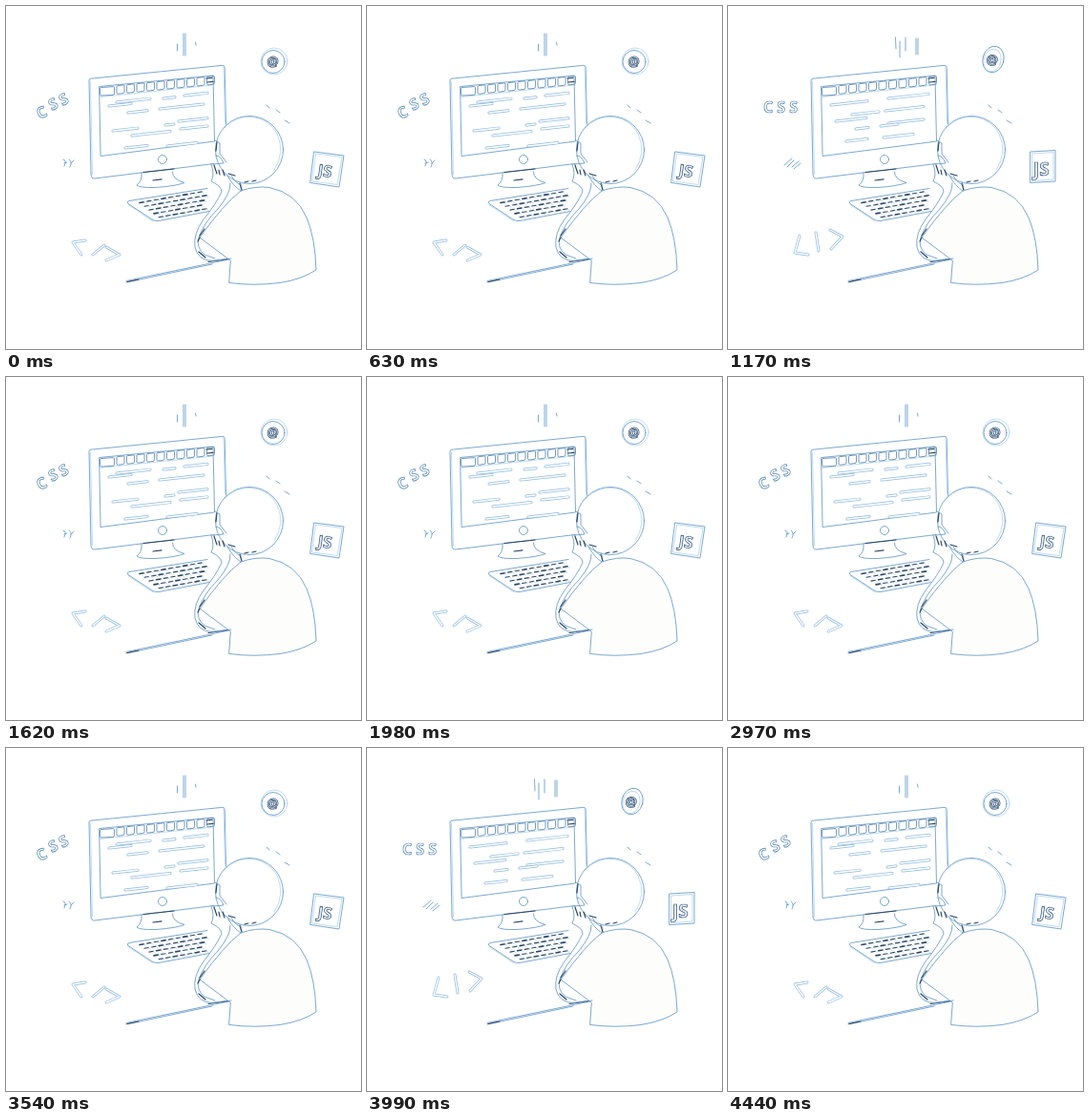
Animation, 372 px wide and 360 px high, one loop 4.5 s. Source, as an HTML page:

```html
<!DOCTYPE html>
<html lang="en">
<head>
<meta charset="utf-8">
<title>Developer at work</title>
<style>
html, body { margin: 0; width: 100%; height: 100%; overflow: hidden; background: #fff; }
svg { display: block; width: 372px; height: 360px; }
path, circle, ellipse, rect { fill: none; stroke: #5b92c5; stroke-width: .8; stroke-linecap: round; stroke-linejoin: round; }
text { font: bold 16px "Open Sans", sans-serif; fill: #fff; stroke: #4a7ead; stroke-width: .7; }
.soft { stroke: #a6cdec; stroke-width: .7; }
.dark { stroke: #2b4562; stroke-width: 1.2; }
.body { fill: #fdfdfc; }
.sign { fill: #e4eef6; stroke: #2f4e70; }
.rest { animation: rest 1.5s step-end infinite; }
.sway { animation: sway 1.5s step-end infinite; }
@keyframes rest { 0%, 86.667% { visibility: visible; } 53.333% { visibility: hidden; } }
@keyframes sway { 0%, 86.667% { visibility: hidden; } 53.333% { visibility: visible; } }
</style>
</head>
<body>
<svg viewBox="0 0 372 360">
  <g id="screen">
    <path d="M218 165.500L93 181Q89 181.500 89 176L87 78Q87 76.500 89 76.200L227 62.300Q229 62 229.200 65L230.500 124"/>
    <path class="soft" d="M88.500 79L90.500 177M228 64L229.500 122"/>
    <path d="M98 84.500L217 73L218.500 142L99.500 157.500Z"/>
    <path class="soft" d="M98.500 95.500L218 82.800"/>
    <circle cx="164" cy="161" r="4.500"/>
  </g>
  <g id="stand">
    <path d="M142 175Q143 184 137 188Q140 191 157 190.500Q178 189 187 185.500Q174 182 174.500 174"/>
    <path class="dark" d="M144 174.500L176 171M154 183L163 181.800"/>
  </g>
  <g id="keyboard">
    <path d="M211 191.500L129 204.500Q126 205.500 128 207.500L153 224Q156 226 160 225.500L213 215.500"/>
    <path class="soft" d="M128 208.500L154 226"/>
  </g>
  <path d="M126 288.500L236 265.500M126 290L216 271"/>
  <path class="dark" d="M212 268.500L236 265M127 289.500L139 287"/>

  <path class="body" d="M235 267L203 243Q228 208 246 194Q262 188.500 276 190.500Q304 196 315 222Q324 243 325 277Q310 287 287 290.500Q260 294 234 290.500Z"/>
  <path d="M215 166Q219 177 215 184Q226 189 226 195Q220 208 207 224Q196 239 198 253Q201 267 216 267.500L236 265"/>
  <path d="M235 186Q236 196 222 213Q207 228 202 243Q199 254 208 261L219 265"/>
  <path class="dark" d="M203 241L208 234M201 247L203 243M202 258L209 264"/>
  <circle cx="255" cy="151" r="35.500" fill="#fff"/>
  <path class="soft" d="M229 128A33.500 33.500 0 0 1 284 134Q293 154 281 172"/>
  <path d="M219 141L224 144L224 155L231 164M220 157Q225 157 228 165L217 166"/>
  <path class="dark" d="M221 143L220 152M218 167L221 176M223 172L224 177M227 172L229 178M233 176L240 178M245 186L247 193M250 185L254 184M258 184L262 183"/>
  <path d="M232 178Q238 189 246 194M236 178Q241 187 247 188"/>
  <path d="M273 104L276 107M283 109L287 112M292 120L297 123"/>

  <g class="rest">
    <g id="linesA"></g>
    <text transform="translate(35 119) rotate(-25)">C</text>
    <text transform="translate(48 110) rotate(-27)" font-size="14">S</text>
    <text transform="translate(59 105) rotate(-27)" font-size="14">S</text>
    <path d="M179.500 40V47M186 29V52M188 29V52M198.500 38L199 41"/>
    <circle cx="281" cy="58" r="14" class="soft"/>
    <circle cx="280" cy="58.500" r="12"/>
    <text class="sign" transform="translate(274 64) rotate(-8)" style="font-size:14px">@</text>
    <path d="M323 153L354 157L349 190L319 185.500Z"/>
    <path class="soft" d="M325 155L352 158.500L347 187.500L321 184Z"/>
    <text class="sign" transform="translate(326 178) rotate(8)" style="font-size:17px">JS</text>
    <path d="M60 161Q64 162 61 168M66 161Q70 164 67 169M64 164L61 165M71 162L68 165"/>
  </g>

  <g class="sway">
    <g id="linesB"></g>
    <text x="37" y="112" textLength="36">CSS</text>
    <path d="M175.500 33L176 45M180 37V54M186 33V47M197 34V51M199 34V51"/>
    <ellipse cx="278" cy="56" rx="11" ry="14" transform="rotate(15 278 56)"/>
    <ellipse class="soft" cx="277" cy="57" rx="9" ry="12" transform="rotate(15 277 57)"/>
    <text class="sign" transform="translate(271 62) rotate(-5)" style="font-size:14px">@</text>
    <path d="M317 153L343 151.500V184L317 185.500Z"/>
    <path class="soft" d="M319 155L341 153.500V182L319 183.500Z"/>
    <text class="sign" x="320" y="178" style="font-size:19px">JS</text>
    <path d="M59 167L67 160M62 169L69 162M67 169L74 163M69 171L76 165"/>
  </g>
</svg>
<script>
const $ = id => document.getElementById(id);

function draw(parent, d, style = {}, cls = '') {
  const p = document.createElementNS('http://www.w3.org/2000/svg', 'path');
  p.setAttribute('d', d);
  if (cls) p.setAttribute('class', cls);
  Object.assign(p.style, style);
  parent.append(p);
}

// A white core over a wider stroke leaves a thin outline.
function tube(parent, d, width) {
  draw(parent, d, { strokeWidth: width, stroke: '#8db9df' });
  draw(parent, d, { strokeWidth: width - 1.4, stroke: '#fff' });
}

// Each bar: left, right, y at the left end.
function bars(id, list) {
  for (const [a, b, y] of list)
    tube($(id), `M${a} ${y}L${b} ${y - (b - a) * .11}`, 3);
}

bars('linesA', [
  [108, 131, 105], [116, 151, 101], [165, 177, 97], [187, 211, 94],
  [128, 148, 112], [161, 207, 108], [112, 138, 131], [167, 176, 125],
  [181, 211, 121], [132, 172, 136], [183, 211, 129], [125, 148, 149], [169, 200, 147]
]);
bars('linesB', [
  [108, 146, 104], [168, 210, 97], [130, 158, 114], [165, 205, 110],
  [113, 145, 121], [168, 205, 123], [134, 147, 129], [160, 178, 126],
  [124, 146, 142], [163, 194, 138]
]);

const codeA = ['M83 246L70 248L79 261', 'M91 261L103 251', 'M105 253L119 261L105 267'];
const codeB = ['M75 241L70 259L84 261', 'M92 238L95 257', 'M107 235L120 242L108 255'];
codeA.forEach(d => tube(document.querySelector('.rest'), d, 2.8));
codeB.forEach(d => tube(document.querySelector('.sway'), d, 2.8));

// Browser tabs
for (let i = 0; i < 11; i++) {
  const x = i ? 105.5 + i * 10.5 : 98.5;
  const w = i ? 8 : 15;
  const y = 85.5 - (x - 98) * .1;
  draw($('screen'), `M${x + 1} ${y}l${w - 2} -.8q1 0 1 1v6q0 1.500 -1.500 1.700l${3 - w} .7q-1.500 0 -1.500 -1.500v-6z`,
    { stroke: '#4d7fae' });
}
draw($('screen'), 'M210 76L216 75.400M211 80L217 79.400', {}, 'dark');

// Keys
for (let row = 0; row < 5; row++)
  for (let k = 0; k < 9; k++) {
    const x = 140 + row * 5 + k * 7.6;
    const y = 206.5 + row * 3.8 - k * 1.35;
    if (x > 208) continue;
    draw($('keyboard'), `M${x} ${y}l4.500 -.8`, { strokeWidth: (row + k) % 3 ? 1.1 : 1.6 }, 'dark');
    draw($('keyboard'), `M${x + 4.5} ${y - .8}l2 1.800`, {}, 'soft');
  }
</script>
</body>
</html>
```
